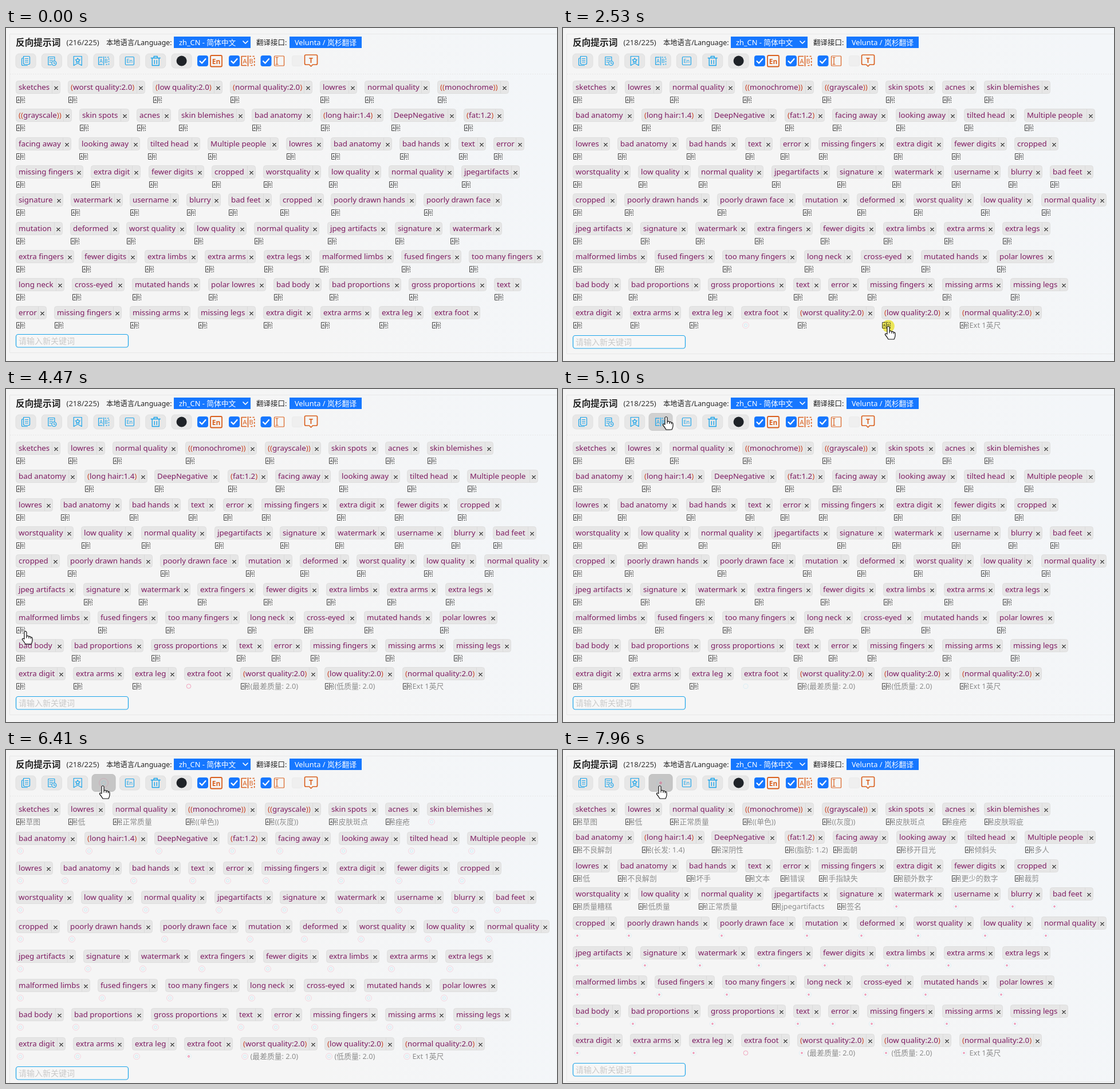
Animation, 962 px wide and 582 px high, one loop 8000 ms. Source, as an HTML page with a canvas:

```html
<!DOCTYPE html>
<html lang="zh-CN">
<head>
<meta charset="utf-8">
<title>反向提示词</title>
<style>
html, body { margin: 0; width: 100%; height: 100%; overflow: hidden; background: #f5f5f5; }
canvas { display: block; }
</style>
</head>
<body>
<canvas id="stage" width="962" height="582"></canvas>
<script>
const ctx = document.getElementById('stage').getContext('2d');
const LOOP = 8000, SWAP = 670, RUN = 5630, RIPPLE = 1157;
const FONT = '"Noto Sans", "Noto Sans CJK SC", "Noto Sans CJK", sans-serif';
const BLUE = '#1677ff', SKY = '#1ba4ea', ORANGE = '#d9601f', PLUM = '#7d1a61';

const words = `sketches|草图,lowres|低,normal quality|正常质量,((monochrome))|((单色)),((grayscale))|((灰度)),
skin spots|皮肤斑点,acnes|痤疮,skin blemishes|皮肤瑕疵,bad anatomy|不良解剖,(long hair:1.4)|(长发: 1.4),
DeepNegative|深阴性,(fat:1.2)|(脂肪: 1.2),facing away|面朝,looking away|移开目光,tilted head|倾斜头,
Multiple people|多人,lowres|低,bad anatomy|不良解剖,bad hands|坏手,text|文本,error|错误,
missing fingers|手指缺失,extra digit|额外数字,fewer digits|更少的数字,cropped|裁剪,worstquality|质量糟糕,
low quality|低质量,normal quality|正常质量,jpegartifacts|jpegartifacts,signature|签名,watermark,username,
blurry,bad feet,cropped,poorly drawn hands,poorly drawn face,mutation,deformed,worst quality,low quality,
normal quality,jpeg artifacts,signature,watermark,extra fingers,fewer digits,extra limbs,extra arms,
extra legs,malformed limbs,fused fingers,too many fingers,long neck,cross-eyed,mutated hands,polar lowres,
bad body,bad proportions,gross proportions,text,error,missing fingers,missing arms,missing legs,
extra digit,extra arms,extra leg,extra foot`.split(/,\s*/).map((s, i) => {
  const [name, gloss] = s.split('|');
  return { name, gloss, i };
});
const weighted = [
  { name: '(worst quality:2.0)', gloss: '(最差质量: 2.0)', from: 3880, wait: 3850 },
  { name: '(low quality:2.0)', gloss: '(低质量: 2.0)', from: 2900, wait: 2680 },
  { name: '(normal quality:2.0)', gloss: 'Ext 1英尺', from: 1380, wait: 1250 }
];
weighted.forEach((w, k) => { w.i = words.length + k; });
const foot = words[words.length - 1];
const before = [words[0], ...weighted, ...words.slice(1)];
const after = [...words, ...weighted];

// Glyph advances in em, used for chip sizes
const EM = {};
Object.entries({
  ijl: .242, bdpq: .589, g: .575, hnu: .565, o: .586, a: .509, e: .523, c: .462, f: .3, k: .497, m: .85,
  r: .335, s: .424, t: .339, v: .479, w: .723, x: .459, y: .455, z: .453, ' ': .255, '()': .28,
  '0124': .539, ':.': .217, '-': .4, D: .701, N: .748, M: .898, E: .506
}).forEach(([set, w]) => [...set].forEach(c => { EM[c] = w; }));
const advance = (s, size) => [...s].reduce((sum, c) => sum + (EM[c] || 1), 0) * size;

const clamp = v => Math.max(0, Math.min(1, v));
const smooth = v => { v = clamp(v); return v * v * (3 - 2 * v); };
function track(keys, t, ease) {
  if (t <= keys[0][0]) return keys[0].slice(1);
  for (let k = 1; k < keys.length; k++) {
    const a = keys[k - 1], b = keys[k];
    if (t < b[0]) {
      const p = ease((t - a[0]) / (b[0] - a[0]));
      return a.slice(1).map((v, j) => v + (b[j + 1] - v) * p);
    }
  }
  return keys[keys.length - 1].slice(1);
}
const pointerKeys = [
  [130, 849, 574], [470, 739, 521], [670, 739, 521], [950, 702, 521], [1300, 702, 521], [1430, 672, 522],
  [2150, 568, 521], [2720, 568, 521], [3080, 543, 538], [3560, 420, 518], [3930, 420, 518],
  [4180, 230, 547], [4430, 30, 440], [4750, 118, 62], [5100, 180, 48], [5420, 169, 62]
];
const doneKeys = [[5680, 0], [6410, 7.2], [6590, 8.1], [7100, 16], [7420, 17], [7740, 25], [7940, 30]];
const clicks = [[960, 1260], [2380, 2690], [3640, 3890], [5480, 5630]];

function text(s, x, y, size, color, weight = 400) {
  ctx.font = `${weight} ${size}px ${FONT}`;
  ctx.fillStyle = color;
  ctx.fillText(s, x, y);
  return ctx.measureText(s).width;
}
function box(x, y, w, h, r, fill, stroke, line = 1) {
  ctx.beginPath();
  ctx.roundRect(x, y, w, h, r);
  if (fill) { ctx.fillStyle = fill; ctx.fill(); }
  if (stroke) { ctx.strokeStyle = stroke; ctx.lineWidth = line; ctx.stroke(); }
}
function path(d, x, y, stroke, line = 1, fill, cap = 'round') {
  const p = new Path2D(d);
  ctx.save();
  ctx.translate(x, y);
  if (fill) { ctx.fillStyle = fill; ctx.fill(p); }
  ctx.strokeStyle = stroke;
  ctx.lineWidth = line;
  ctx.lineJoin = 'round';
  ctx.lineCap = cap;
  ctx.stroke(p);
  ctx.restore();
}
function label(s, cx, y, size, color, weight) {
  ctx.textAlign = 'center';
  text(s, cx, y, size, color, weight);
  ctx.textAlign = 'left';
}

// Translate icon: solid left half, dashed right half
function abIcon(cx, cy, s, color, line = 1) {
  const w = 7 * s, h = 5 * s;
  path(`M${-1.5 * s} ${-h}H${-w}V${h}H${-1.5 * s}M0 ${-h - s}V${h + s}`, cx, cy, color, line, null, 'butt');
  ctx.setLineDash([2 * s, 1.5 * s]);
  path(`M${1.5 * s} ${-h}H${w}V${h}H${1.5 * s}`, cx, cy, color, line, null, 'butt');
  ctx.setLineDash([]);
  label('A', cx - 3.5 * s, cy + 2.5 * s, 6.8 * s, color);
  label('B', cx + 3.4 * s, cy + 2.5 * s, 6.8 * s, color);
}

function bezier(p, x1, y1, x2, y2) {
  let lo = 0, hi = 1, u = .5;
  const at = (a, b) => 3 * u * (1 - u) * (1 - u) * a + 3 * u * u * (1 - u) * b + u * u * u;
  for (let k = 0; k < 14; k++) {
    if (at(x1, x2) < p) lo = u; else hi = u;
    u = (lo + hi) / 2;
  }
  return at(y1, y2);
}
function ripple(cx, cy, size, t, start) {
  ['#e90c59', '#46c8f0'].forEach((color, k) => {
    const p = (((t - start) / RIPPLE + k / 2) % 1 + 1) % 1;
    ctx.globalAlpha = (1 - bezier(p, .2, 0, .8, 1)) * (k ? .3 : .65);
    ctx.beginPath();
    ctx.arc(cx, cy, .4 + size * bezier(p, 0, .2, .8, 1), 0, 7);
    ctx.strokeStyle = color;
    ctx.lineWidth = .9;
    ctx.stroke();
  });
  ctx.globalAlpha = 1;
}

function checkbox(x, on) {
  if (!on) return box(x + .5, 48.5, 18, 18, 3, '#efefef', '#ebebeb');
  box(x, 48, 19, 19, 4, BLUE);
  path('M4.5 10L8 13.5L14.5 6', x, 48, '#fff', 2.2);
}

function header(t) {
  text('反向提示词', 17, 31, 15.7, '#222', 700);
  text(`(${t < SWAP ? 216 : 218}/225)`, 105.5, 30, 13, '#333');
  text('本地语言/Language:', 175, 29.5, 12.3, '#222');
  box(293, 15, 134, 20, 0, BLUE);
  text('zh_CN - 简体中文', 302, 30, 12.8, '#fff');
  path('M-4 -2L0 2L4 -2', 418, 25, '#fff', 1.7);
  text('翻译接口:', 437, 29.5, 12.5, '#222');
  box(495, 15, 126, 20, 0, BLUE);
  label('Velunta / 岚杉翻译', 558, 30, 12.8, '#fff');
}

const glyphs = [
  (x, y) => path('M-4 -8H5Q7 -8 7 -6V4Q7 6 5 6H-2Q-4 6 -4 4ZM-4 -5H-5Q-7 -5 -7 -3V6Q-7 8 -5 8H3M-1 -4H4M-1 -1H4M-1 2H4', x, y, SKY, 1.2),
  (x, y) => path('M-1 7H-6V-7H5V-1M-3.5 -4H2.5M-3.5 -1H1M-3.5 2H-1M4 0A4 4 0 1 0 4 8A4 4 0 1 0 4 0M4 2V4.5H6', x, y, SKY, 1.2),
  (x, y) => path('M-7 -8H7V8L0 4L-7 8ZM0 -5L1.2 -2.4L4 -2L2 0L2.5 2.7L0 1.4L-2.5 2.7L-2 0L-4 -2L-1.2 -2.4Z', x, y, SKY, 1.2),
  (x, y) => abIcon(x, y, 1.28, SKY, 1.2),
  (x, y) => { box(x - 7.5, y - 7, 15, 14, 1.5, null, SKY, 1.2); label('En', x, y + 3.5, 9, SKY, 500); },
  (x, y) => path('M-8 -5H8M-3 -5V-8H3V-5M-6 -5V8H6V-5M-2 -1V5M2 -1V5', x, y, SKY, 1.4),
  (x, y) => { ctx.beginPath(); ctx.arc(x, y, 9, 0, 7); ctx.fillStyle = '#1f2328'; ctx.fill(); }
];
function toolbar(t) {
  const third = smooth((t - 4700) / 90) * (1 - smooth((t - 4870) / 160));
  const fourth = smooth((t - 4870) / 160);
  glyphs.forEach((draw, k) => {
    const x = 34.5 + k * 45.35, y = 57.5;
    const hot = k === 2 ? third : k === 3 ? fourth : 0;
    const press = k === 3 ? smooth((t - 5500) / 130) : 0;
    const w = 35 + 6 * hot, h = 25 + 5 * hot;
    const shade = Math.round(231 - 22 * hot - 12 * press), rim = shade - 7;
    box(x - w / 2, y - h / 2, w, h, 6, `rgb(${shade},${shade},${shade})`, `rgb(${rim},${rim},${rim})`);
    if (k === 3 && t >= RUN) ripple(x, y, 9, t, 6745);
    else draw(x, y);
  });
  [334, 389, 444.5, 499].forEach((x, k) => checkbox(x, k < 3));
  box(357, 48, 20, 19.5, 2, null, ORANGE, 1.8);
  label('En', 367, 62.5, 12, ORANGE, 600);
  abIcon(422.5, 57.5, 1.6, ORANGE, 1.6);
  box(468.5, 49, 17, 17, 1, null, ORANGE, 1.2);
  path('M-2 -6H2M0 -6V6M-2 6H2', 473, 57.5, ORANGE, 1.2);
  path('M-9 -10H9Q11 -10 11 -8V5Q11 7 9 7H3L0 10L-3 7H-9Q-11 7 -11 5V-8Q-11 -10 -9 -10Z', 532.5, 57, ORANGE, 1.7);
  label('T', 532.5, 60.5, 12, ORANGE, 600);
}

function layout(t) {
  const done = Math.floor(track(doneKeys, t, v => v)[0]);
  const rows = [];
  let x = Infinity, row;
  for (const item of t < SWAP ? before : after) {
    const loading = t >= RUN ? item.i >= done
      : item === foot ? t >= SWAP
      : item.wait !== undefined && t >= item.wait && t < item.from;
    const shown = item.from !== undefined ? t >= item.from : t >= RUN && !loading;
    const gloss = shown ? item.gloss : '';
    const w = advance(item.name, 14.4) + 24;
    if (x + w > 953) {
      x = 17;
      row = { chips: [], busy: false };
      rows.push(row);
    }
    row.chips.push({ item, x, w, loading, gloss });
    row.busy = row.busy || loading;
    x += Math.max(w, gloss ? 15 + advance(gloss, 13) : 0) + 13;
  }
  return rows;
}

function chip(c, y, t) {
  const x = Math.round(c.x), w = Math.round(c.w);
  box(x + .5, y + .5, w - 1, 22, 4, '#e6e6e6', '#dedede');
  ctx.fillStyle = '#dadada';
  ctx.fillRect(x + w - 15, y + 1, 1, 21);
  let tx = x + 5;
  c.item.name.split(/([()]+)/).filter(Boolean).forEach(part => {
    tx += text(part, tx, y + 16, 13.3, /[()]/.test(part) ? '#cb4526' : PLUM);
  });
  path('M-2.7 -2.7L2.7 2.7M2.7 -2.7L-2.7 2.7', x + w - 7.5, y + 13, '#222', 1.2);
  const cy = y + 33.5;
  if (c.loading) ripple(x + 8, cy, 6, t, c.item === foot ? 1685 : 6745);
  else abIcon(x + 8.5, cy, 1, '#3c3c3c', 1);
  if (c.gloss) text(c.gloss, x + 17.5, cy + 4.5, 12.8, '#8c8c8c');
}

function pointer(t) {
  if (t < 130) return;
  const [x, y] = track(pointerKeys, t, smooth);
  if (clicks.some(([a, b]) => t >= a && t < b)) {
    ctx.globalCompositeOperation = 'multiply';
    ctx.beginPath();
    ctx.arc(x, y, 10.8, 0, 7);
    ctx.fillStyle = '#f6f05a';
    ctx.fill();
    ctx.globalCompositeOperation = 'source-over';
  }
  path('M-2 2Q0 -1 2 2V9Q4.2 7.4 6 9.6Q8.4 8.6 9.4 11Q12 10.4 12 13V17Q11.6 20 10 23H0Q-2.5 18.5 -5.6 15Q-6 12 -2 14Z' +
    'M2 9V12M6 9.8V12.5M9.4 11V13', x, y, '#111', 1.2, '#fff');
}

function draw(t) {
  const bg = ctx.createLinearGradient(480, 300, 962, 200);
  bg.addColorStop(0, '#f5f5f5');
  bg.addColorStop(1, '#f3f6f9');
  ctx.fillStyle = bg;
  ctx.fillRect(0, 0, 962, 582);

  const rows = layout(t);
  let y = 92;
  for (const row of rows) {
    row.y = Math.round(y);
    y += 49.3 + (row.busy ? 2 : 0);
  }
  const bottom = Math.round(y - .7);

  box(6.5, 10.5, 980, bottom + 22, 0, null, '#e8e8e8');
  ctx.setLineDash([2, 2]);
  path('M7 80.5H962', 0, 0, '#e7e7e7', 1, null, 'butt');
  ctx.setLineDash([]);
  header(t);
  toolbar(t);
  rows.forEach(row => row.chips.forEach(c => chip(c, row.y, t)));
  box(17.5, bottom + .5, 196, 22.5, 4, '#f7f7f7', SKY, 1.2);
  text('请输入新关键词', 22, bottom + 17, 14, '#c9c9c9');
  pointer(t);
}

function frame() {
  draw(performance.now() % LOOP);
  requestAnimationFrame(frame);
}
frame();
</script>
</body>
</html>
```
